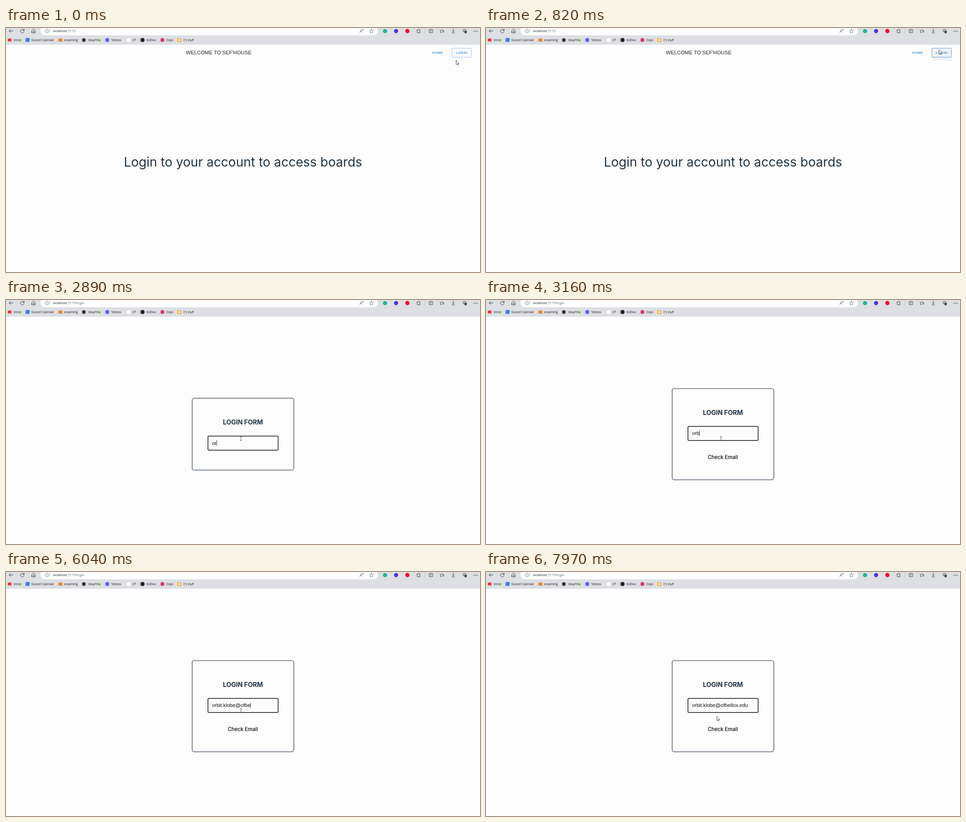
An HTML page that plays this animation: 1044x537 px, repeating every 8 s.

```html
<!DOCTYPE html>
<html lang="en">
<head>
<meta charset="utf-8">
<title>Login form</title>
<style>
  html, body { margin: 0; width: 100%; height: 100%; overflow: hidden; background: #fdfdfd; }
  svg { display: block; width: 100%; height: 100%; }
  .ui { font: 6.5px "Open Sans", sans-serif; fill: #1d1d1f; }
  .url { font-size: 7.4px; }
  .icon { fill: none; stroke: #333538; stroke-width: .9; stroke-linecap: round; stroke-linejoin: round; }
  .arial { font: 11.2px "Liberation Sans", Arial, sans-serif; }
  .inter { font-family: Inter, sans-serif; fill: #213547; text-anchor: middle; }
  .button { font-size: 7.9px; letter-spacing: .02857em; fill: #1976d2; }
  #login rect { fill: #fdfdfd; stroke: #8cbae8; }
  #login .shade { fill: none; stroke: none; }
  #login.hover rect { fill: #eff2f5; stroke: #4a91da; }
  #login.hover .shade { fill: #f1f2f4; stroke: none; }
  #field { fill: #fdfdfd; stroke: #c4c4c4; stroke-width: .8; }
  #field.hover { stroke: #6c6c6c; }
  #field.focus { stroke: #111; stroke-width: 1.5; }
  .hidden { display: none; }
</style>
</head>
<body>
<svg viewBox="0 0 1044 537" preserveAspectRatio="none">
  <rect width="1044" height="537" fill="#fdfdfd"/>

  <!-- browser toolbar -->
  <rect width="1044" height="36.7" fill="#dddfe3"/>
  <rect x="76" y="-4" width="743" height="20" rx="9" fill="#fdfdfd"/>
  <g class="icon">
    <path d="M15.5 6.5H7M10.5 2.8L6.8 6.5l3.7 3.7"/>
    <path d="M39.6 5A4 4 0 1 0 40 7M40 2.4V5.2H37.2"/>
    <path d="M56.7 5.8L60.5 2.5l3.8 3.3v5h-2.6V7.6h-2.4v3.2h-2.6z"/>
    <g stroke="#66686b" stroke-width=".8">
      <circle cx="90.5" cy="6.6" r="4.3"/>
      <path d="M90.5 6.2v2.6M90.5 4.5v.1"/>
      <path d="M779.2 10l2.7-6.6 2.7 6.6M780.2 7.7h3.4M785 5.2V2.8l1.8 2.4V2.8"/>
      <path id="star" d="M805 2.2l1.4 3 3.2.4-2.4 2.2.6 3.3-2.8-1.6-2.8 1.6.6-3.3-2.4-2.2 3.2-.4z"/>
    </g>
    <path d="M905.6 4.1h2a1.3 1.3 0 0 1 2.6 0h2v2.1a1.2 1.2 0 0 0 0 2.4v2.1h-6.6V8.6a1.2 1.2 0 0 0 0-2.4z"/>
    <path d="M922.5 2v9" stroke="#b5b8bd"/>
    <path d="M935.8 2.3v9M934.4 3.3h-2.6v6.8h2.6M937.2 3.3h2.6v6.8h-2.6"/>
    <path d="M959.6 2.5l1.2 2.6 2.8.4M958.3 5.1l-2.8.4 2.1 2-.5 2.9 2.5-1.4M962 7h3M962 9h3"/>
    <path d="M985.2 2v6M982.7 5.7l2.5 2.5 2.5-2.5M982 10.8h6.4"/>
    <path d="M1010 10.3l-3.6-3.5a2.2 2.2 0 0 1 3.6-2.9 2.2 2.2 0 0 1 3.7 2.7M1007.5 6.8h1.4l1-1.5 1 2.2"/>
    <rect x="1010.4" y="7" width="4.2" height="3.8" rx="1" fill="#333538"/>
  </g>
  <g fill="#333538">
    <circle cx="1031.2" cy="7" r=".9"/><circle cx="1034.6" cy="7" r=".9"/><circle cx="1038" cy="7" r=".9"/>
  </g>
  <circle cx="834.8" cy="6.8" r="4.6" fill="#18b98e"/>
  <circle cx="859.2" cy="6.8" r="4.6" fill="#5d2fc6"/>
  <circle cx="884" cy="6.8" r="4.7" fill="#e3172d"/>
  <text class="ui url" x="103.3" y="9.3">localhost<tspan id="path" fill="#6d6f73">:5173</tspan></text>

  <!-- bookmarks -->
  <rect x="4" y="23.2" width="8" height="6.4" fill="#dc4437"/>
  <rect x="43.2" y="22" width="8.6" height="8.6" fill="#3f7de8"/>
  <rect x="115.2" y="23" width="9" height="7" fill="#ef8a2c"/>
  <circle cx="171.5" cy="26.4" r="4" fill="#35302d"/>
  <circle cx="223" cy="26.4" r="4.5" fill="#5662ea"/>
  <circle cx="269.5" cy="26.4" r="4.6" fill="#fafafa"/>
  <circle cx="300.6" cy="26.4" r="4.6" fill="#1b1f23"/>
  <circle cx="344.5" cy="26.4" r="4.4" fill="#db3a63"/>
  <path d="M377.4 22.8h3.6l1.2 1.3h4v6h-8.8z" fill="#f7d774" stroke="#b3903a" stroke-width=".7"/>
  <g class="ui">
    <text x="16.4" y="28.7">Vimol</text>
    <text x="56" y="28.7">Dunvel Calendar</text>
    <text x="128.3" y="28.7">eLearning</text>
    <text x="180.4" y="28.7">HexaTink</text>
    <text x="231.5" y="28.7">Tolbrex</text>
    <text x="278.4" y="28.7">CP</text>
    <text x="309" y="28.7">KelDun</text>
    <text x="352.8" y="28.7">Zirpo</text>
    <text x="390.8" y="28.7">CS stuff</text>
  </g>

  <g id="home">
    <text class="arial" x="396.3" y="58.3" fill="#212121" letter-spacing=".0075em">WELCOME TO SEF'HOUSE</text>
    <text class="arial button" x="938" y="57.2">HOME</text>
    <g id="login">
      <rect class="shade" x="982" y="65" width="43.5" height="7"/>
      <rect x="982" y="44.4" width="43.3" height="19.9" rx="2.3" stroke-width=".9"/>
      <text class="arial button" x="990.8" y="57.2">LOGIN</text>
    </g>
    <text class="inter" x="522" y="305.4" font-size="28.1">Login to your account to access boards</text>
  </g>

  <g id="form">
    <rect id="card" x="410.1" width="223.8" rx="4.5" fill="#fdfdfd" stroke="#868f9a" stroke-width="2.2"/>
    <g id="upper">
      <text class="inter" x="521.8" y="274" font-size="14.06" font-weight="700">LOGIN FORM</text>
      <rect id="field" x="444.8" y="299.5" width="154.6" height="30.9" rx="1.6"/>
      <text id="value" class="arial" x="453.7" y="318.7"></text>
      <path id="caret" d="M0 308.4v12.6" stroke="#111" stroke-width=".8"/>
    </g>
    <text id="check" class="inter" x="521.6" y="349.5" font-size="11.25" font-weight="500" style="fill:#0c0c0c">Check Email</text>
  </g>

  <path id="arrow" d="M.4.4V9.6L2.6 7.6l1.5 3.2 1.5-.7L4.1 7H7z" fill="#fff" stroke="#2a2a2a" stroke-width=".8"/>
  <path id="beam" d="M-2-4.6h1.4l.6.5.6-.5H2M0-4.1v8.2M-2 4.6h1.4l.6-.5.6.5H2" fill="none" stroke="#333" stroke-width=".85"/>
</svg>
<script>
const LOOP = 8000;
const EMAIL = "orbit.klobe@ofbellox.edu";
const $ = id => document.getElementById(id);
const show = (id, on) => $(id).classList.toggle("hidden", !on);

// Each list holds [start ms, value...]; a value stays until the next start.
const pointer = [
  [0, 991, 71], [130, 992, 70], [270, 994, 67], [410, 996, 60], [550, 997, 52],
  [680, 997.5, 48], [960, 820, 150], [1100, 610, 262], [1230, 560, 284],
  [1360, 523, 303], [1490, 517.5, 304], [2050, 517.5, 305], [7970, 508, 317.5]
];
const typed = [
  [0, 0], [2590, 1], [2890, 2], [3160, 3], [3290, 4], [3590, 6], [3860, 7], [4000, 8],
  [4130, 9], [4400, 10], [4540, 11], [5360, 12], [5500, 13], [5770, 14], [5910, 15],
  [6040, 16], [6180, 17], [6310, 18], [6450, 19], [6590, 20], [6720, 22], [7000, 23], [7140, 24]
];
const caret = [[0, false], [1770, true], [2330, false], [2590, true], [5090, false], [5360, true], [7570, false]];

const at = (list, t) => list.findLast(step => step[0] <= t).slice(1);
const within = (t, from, to) => t >= from && t < to;

function render(t) {
  const onForm = t >= 960, expanded = t >= 3160, focused = t >= 1770;
  show("home", !onForm);
  show("form", onForm);
  $("path").textContent = onForm ? ":5173/login" : ":5173";
  $("login").classList.toggle("hover", within(t, 410, 960));

  const top = expanded ? 195 : 216.2;
  $("card").setAttribute("y", top);
  $("card").setAttribute("height", 2 * (295.3 - top));
  $("upper").setAttribute("transform", `translate(0 ${expanded ? -21.2 : 0})`);
  show("check", expanded);

  const text = EMAIL.slice(0, at(typed, t)[0]);
  $("field").setAttribute("class", focused ? "focus" : t >= 1360 ? "hover" : "");
  $("value").textContent = text || "Enter your email";
  $("value").setAttribute("fill", text ? "#111" : "#757575");
  show("caret", at(caret, t)[0]);
  const caretX = 454 + (text && onForm ? $("value").getComputedTextLength() : 0);
  $("caret").setAttribute("transform", `translate(${caretX} 0)`);

  const [x, y] = at(pointer, t);
  const overField = within(t, 1360, 7970);
  show("arrow", !overField);
  show("beam", overField);
  $(overField ? "beam" : "arrow").setAttribute("transform", `translate(${x} ${y})`);
}

let start;
function tick(now) {
  start ??= now;
  render((now - start) % LOOP);
  requestAnimationFrame(tick);
}
render(0);
requestAnimationFrame(tick);
</script>
</body>
</html>
```
